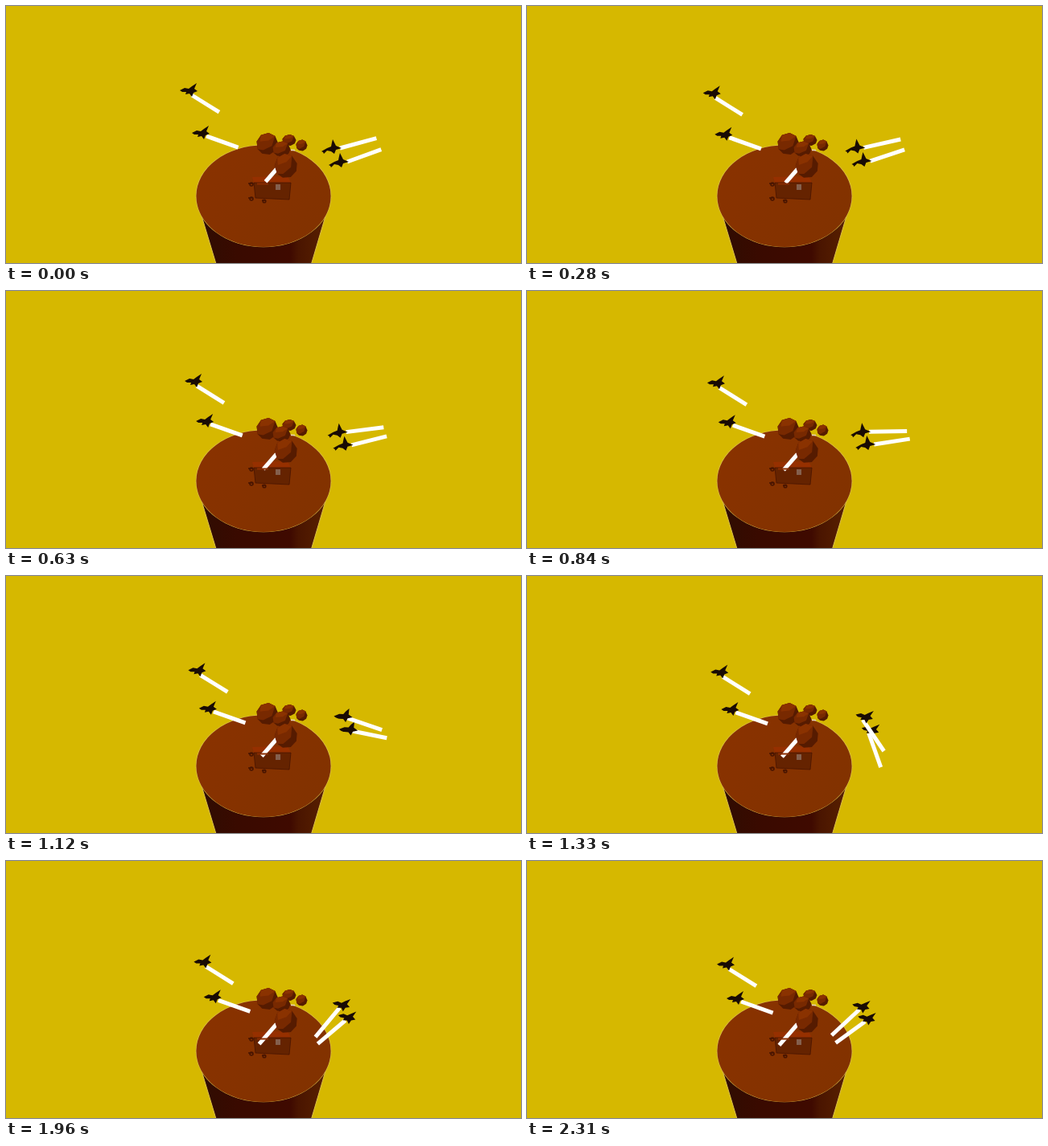
Animation, 640 px wide and 320 px high, one loop 2380 ms. Source, as an HTML page:

```html
<!DOCTYPE html>
<html lang="en">
<head>
<meta charset="utf-8">
<title>Birds over the island</title>
<style>
  html, body { margin: 0; width: 100%; height: 100%; overflow: hidden; background: #d6b800; }
  svg { display: block; width: 100%; height: 100%; }
  .bird { fill: #190b04; }
  .trail { stroke: #fff; stroke-width: 5; }
  .lit { fill: #8a3200; }
  .mid { fill: #782900; }
  .dim { fill: #561b00; }
</style>
</head>
<body>
<svg viewBox="0 0 640 320">
  <defs>
    <linearGradient id="side">
      <stop offset="0" stop-color="#2e0d02"/>
      <stop offset=".3" stop-color="#390a00"/>
      <stop offset=".7" stop-color="#3f0a00"/>
      <stop offset=".76" stop-color="#4a1500"/>
      <stop offset="1" stop-color="#5c2300"/>
    </linearGradient>
    <linearGradient id="ground" x2="1" y2=".6">
      <stop offset="0" stop-color="#8a3200"/>
      <stop offset="1" stop-color="#823200"/>
    </linearGradient>
    <g id="tree">
      <path class="dim" d="M-10 -2 L-6 -8 1 -10 7 -7 10 0 8 6 2 10 -5 9 -9 5Z"/>
      <path class="mid" d="M-10 -2 L-6 -8 1 -10 7 -7 4 2 -4 6 -9 5Z"/>
      <path class="lit" d="M-6 -8 L1 -10 7 -7 1 -3 -7 -2Z"/>
    </g>
  </defs>

  <rect width="640" height="320" fill="#d6b800"/>

  <g id="island">
    <path d="M236 238 L261 321 H379.5 L404 238Z" fill="url(#side)" stroke="#dcc04a"/>
    <ellipse cx="320" cy="236.5" rx="84.3" ry="63.8" fill="#dcc04a"/>
    <ellipse cx="320" cy="236.7" rx="83.6" ry="63.3" fill="url(#ground)"/>
  </g>

  <path d="M354 179.5 h5" stroke="#e8d4b8" stroke-width="1.5"/>
  <use href="#tree" transform="translate(352 167) scale(.85 .7)"/>
  <use href="#tree" transform="translate(367.5 173.5) scale(.7)"/>
  <use href="#tree" transform="translate(325 171.5) scale(1.35)"/>
  <use href="#tree" transform="translate(342.5 178) scale(1.1 .95)"/>

  <g id="cabin">
    <path d="M306 213 L350 212 354 220 H308Z" fill="#963000"/>
    <path d="M308 220 H354 L352 241 310 239Z" fill="#652300" stroke="#481500" stroke-width=".8"/>
    <path d="M335 222 h6 v7 h-6z" fill="#84604d"/>
    <g fill="none" stroke="#481500" stroke-width="1.6">
      <path d="M301 221 h6 M301 239 h6 M318 242 h5"/>
      <circle cx="305" cy="222" r="2"/>
      <circle cx="305" cy="240" r="2"/>
      <circle cx="321" cy="243" r="1.8"/>
    </g>
  </g>

  <line class="trail" id="beam"/>
  <path d="M312 221.5 H326" stroke="#8a2c00" stroke-width="2"/>
  <use href="#tree" transform="translate(348 199) rotate(-12) scale(1.4 1.5)"/>
  <g id="flock"></g>
</svg>
<script>
const STEP = 70, LOOP = 2380, END = LOOP - STEP;
const $ = id => document.getElementById(id);
const points = s => s.split(' ').map(p => p.split(',').map(Number));
const mix = (a, b, k) => a + (b - a) * k;
const smooth = k => (k = Math.min(1, Math.max(0, k)), k * k * (3 - 2 * k));

const glide = points('-12,0 -6,-3 -1,-2 3,-5 9,-9 6,-2 10,1 5,3 3,8 0,4 -5,5 -4,2 -9,2');
const bank = points('-12,5 -5,1 0,-1 1,-6 2,-10 6,-2 13,1 6,3 4,8 0,5 -5,4 -9,8 -10,6');

function add(tag, cls) {
  const el = document.createElementNS('http://www.w3.org/2000/svg', tag);
  el.setAttribute('class', cls);
  $('flock').append(el);
  return el;
}

function setLine(el, x, y, deg, length) {
  const a = deg * Math.PI / 180;
  const ends = { x1: x, y1: y, x2: x + length * Math.cos(a), y2: y + length * Math.sin(a) };
  for (const k in ends) el.setAttribute(k, ends[k]);
}

function makeBird() {
  const line = add('line', 'trail'), body = add('polygon', 'bird');
  return (x, y, tilt, turn, [tx, ty, deg, length]) => {
    setLine(line, x + tx, y + ty, deg, length);
    body.setAttribute('transform', `translate(${x} ${y}) rotate(${tilt})`);
    body.setAttribute('points', bank.map(([px, py], i) =>
      [mix(px, glide[i][0], turn), mix(py, glide[i][1], turn)]).join(' '));
  };
}

function glider(x, y, dx, dy, trail) {
  const pose = makeBird();
  return (t, drift) => pose(x + dx * drift, y + dy * drift, 0, 1, trail);
}

// Flies one straight course, then another; the trail swings round in between.
function turner(from, to, mid, width, swing, length) {
  const pose = makeBird();
  return t => {
    const k = smooth((t - 850) / 500), p = t / END;
    const [x, y] = [0, 1].map(i =>
      mix(from[i] + from[i + 2] * p, to[i] + to[i + 2] * p, k));
    const deg = 63 + swing * Math.atan((t - mid) / width);
    pose(x, y, 12 * k, k, [mix(11, -3, k), mix(1, 4, k), deg, length]);
  };
}

const birds = [
  glider(228, 105, 20, 23.5, [3, 6, 32, 40]),
  glider(243, 158, 17, 13, [6, 4, 19.5, 42]),
  turner([413, 193, 20, -8], [434, 186, -11, 10], 1310, 150, 57, 45),
  turner([404, 176, 28, -5], [426, 167, -10, 14], 1360, 240, 56, 47)
];

function draw(now) {
  const t = Math.floor(now % LOOP / STEP) * STEP, p = t / END;
  const drift = 1.15 * p - 0.15 * p * p;
  birds.forEach(move => move(t, drift));
  setLine($('beam'), 338, 201, 131, mix(23.5, 37.5, drift));
}

const start = performance.now();
function tick() {
  draw(performance.now() - start);
  requestAnimationFrame(tick);
}
tick();
</script>
</body>
</html>
```
